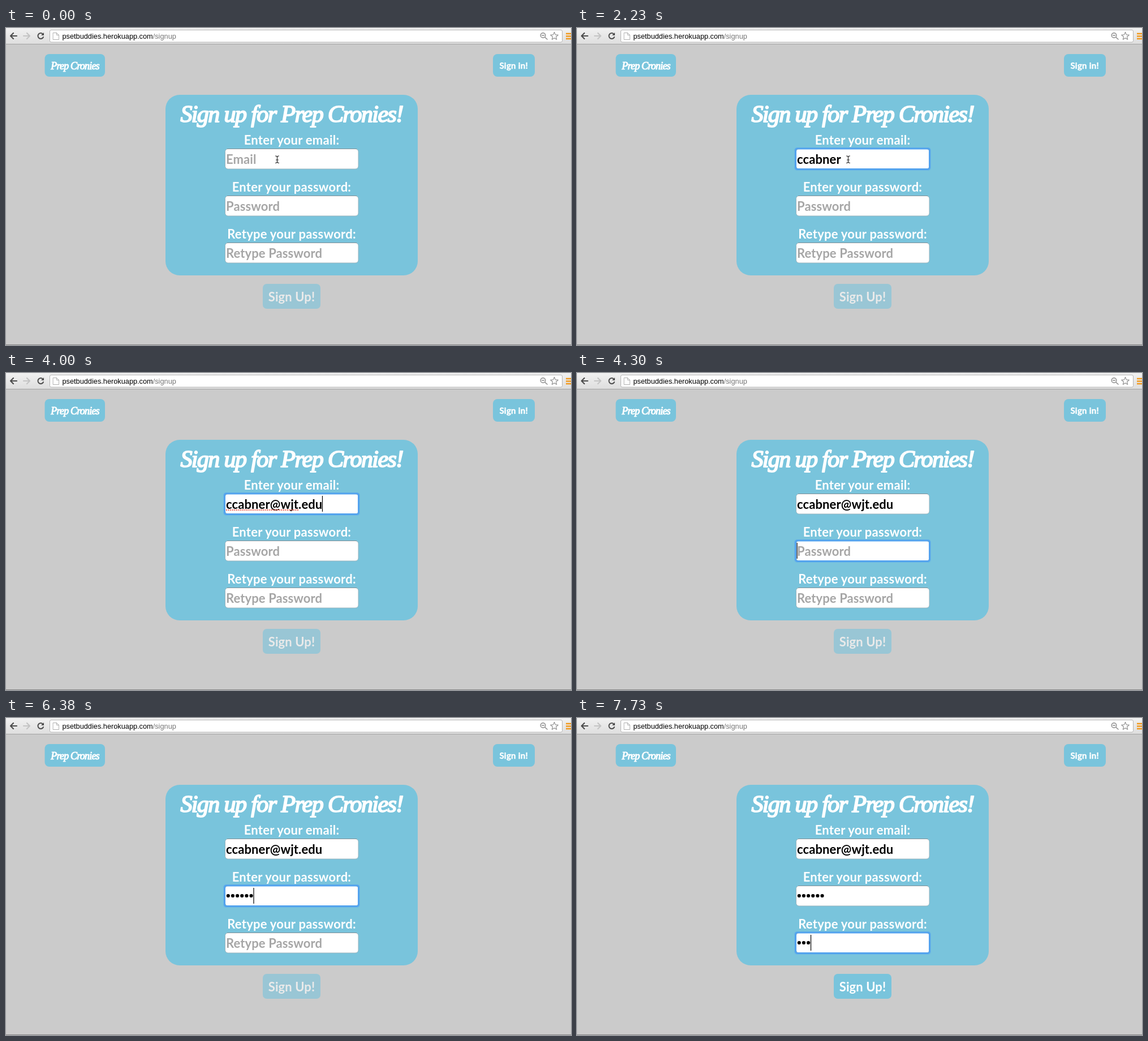
Recreate the animation shown at these times as an HTML page. Size 999 by 560 pixels, loop 8000 ms.

```html
<!DOCTYPE html>
<html lang="en">
<head>
<meta charset="utf-8">
<title>Sign up</title>
<style>
  html, body { margin: 0; width: 100%; height: 100%; overflow: hidden; background: #cbcbcb; }
  svg { display: block; }
  .url { font: 12.75px "Liberation Sans", Arial, sans-serif; }
  .body { font: 700 22px Lato, sans-serif; letter-spacing: .1px; fill: #fff; }
  .label { letter-spacing: .25px; }
  .small { font-size: 15px; letter-spacing: .25px; stroke: #fff; stroke-width: .4; stroke-linejoin: round; }
  .script {
    font: italic 400 42px "Liberation Serif", "Times New Roman", serif; letter-spacing: -1.6px;
    fill: #fff; stroke: #fff; stroke-width: 2; stroke-linejoin: round;
  }
  .brand { font-size: 18px; letter-spacing: -.8px; stroke-width: 1; }
  .mid { text-anchor: middle; }
  .blue { fill: #79c4dc; }
  .hint { fill: #a6a6a6; }
  .typed { fill: #000; }
  .box { fill: #fff; stroke: #9ab4bd; }
  .edge { stroke: #7f9097; }
  .ring { fill: none; stroke: #53a3ee; stroke-width: 3; }
  .glow { fill: none; stroke: #53a3ee; stroke-opacity: .3; }
  .caret { fill: #000; }
  .spell { stroke: #ee5a4a; stroke-width: 2; stroke-dasharray: 2 1.6; }
  .icon { fill: none; stroke-linecap: round; stroke-linejoin: round; }
</style>
</head>
<body>
<svg id="stage" width="999" height="560" viewBox="0 0 999 560">
  <defs>
    <linearGradient id="bar" x2="0" y2="1">
      <stop stop-color="#f1f1f1"/><stop offset="1" stop-color="#dedede"/>
    </linearGradient>
  </defs>
  <rect width="999" height="560" fill="#cbcbcb"/>

  <!-- browser bar -->
  <rect width="999" height="28" fill="url(#bar)"/>
  <rect y="28" width="999" height="1" fill="#a3a3a3"/>
  <rect x="77.5" y="3.5" width="906" height="21.5" rx="2.5" fill="#fff" stroke="#b4b4b4"/>
  <g class="icon">
    <path d="M19 14H8M13 9L8 14L13 19" stroke="#4d4d4d" stroke-width="2.2"/>
    <path d="M31 14H42M37 9L42 14L37 19" stroke="#c4c4c4" stroke-width="2.2"/>
    <path d="M65.5 11A5 5 0 1 0 66 16" stroke="#4d4d4d" stroke-width="2"/>
    <path d="M67 8V13H62Z" fill="#4d4d4d"/>
    <path d="M83.5 8.5H89.5L93.5 12.5V20.5H83.5ZM89.5 8.5V12.5H93.5" stroke="#b0b0b0"/>
    <circle cx="949.5" cy="13" r="4.3" stroke="#8a8a8a" stroke-width="1.4"/>
    <path d="M953 16.5L957 20M947.5 13H951.5" stroke="#8a8a8a" stroke-width="1.5"/>
    <path id="star" stroke="#8c8c8c" stroke-width="1.1"/>
  </g>
  <path d="M990 10H999M990 14.5H999M990 19H999" stroke="#f29a1f" stroke-width="2.4"/>
  <text class="url" x="99.5" y="18.5">psetbuddies.herokuapp.com<tspan fill="#777">/signup</tspan></text>

  <!-- page -->
  <rect class="blue" x="68.5" y="46" width="106.5" height="40" rx="8"/>
  <text class="script brand mid" x="122" y="73">Prep Cronies</text>
  <rect class="blue" x="861" y="46" width="74" height="40" rx="8"/>
  <text class="body small mid" x="897.7" y="72.3">Sign in!</text>
  <rect class="blue" x="282" y="118" width="446" height="319" rx="25"/>
  <text class="script mid" x="505" y="166">Sign up for Prep Cronies!</text>
  <g id="fields"></g>
  <g id="button">
    <rect class="blue" x="454" y="452" width="102" height="44" rx="7"/>
    <text class="body mid" x="505" y="482.5">Sign Up!</text>
  </g>
  <path id="mouse" class="icon" stroke="#222" stroke-width="1.1"
        d="M476.5 226Q479.5 226 479.5 228.5Q479.5 226 482.5 226M479.5 228V236M477.5 233H481.5M476.5 238.5Q479.5 238.5 479.5 236Q479.5 238.5 482.5 238.5"/>
  <rect y="559" width="999" height="1" fill="#858585"/>
</svg>
<script>
const LOOP = 8000, LEFT = 389, GAP = 83, DOT = 8.15, MAX_DOTS = 6;
const EMAIL = 'ccabner@wjt.edu';
const $ = id => document.getElementById(id);

function add(parent, tag, attrs, text = '') {
  const el = document.createElementNS('http://www.w3.org/2000/svg', tag);
  for (const key in attrs) el.setAttribute(key, attrs[key]);
  el.textContent = text;
  return parent.appendChild(el);
}
const show = (el, on) => el.setAttribute('visibility', on ? 'visible' : 'hidden');

const starPoints = Array.from({ length: 10 }, (_, i) => {
  const r = i % 2 ? 3.2 : 7.2, a = i * Math.PI / 5;
  return (969.5 + r * Math.sin(a)).toFixed(1) + ' ' + (14.5 - r * Math.cos(a)).toFixed(1);
});
$('star').setAttribute('d', 'M' + starPoints.join('L') + 'Z');

function makeField(label, hint, row) {
  const g = add($('fields'), 'g', { transform: `translate(0 ${row * GAP})` });
  add(g, 'text', { class: 'body label mid', x: 505, y: 205.6 }, label);
  add(g, 'rect', { class: 'box', x: 387.5, y: 213.5, width: 235.5, height: 35.5, rx: 5 });
  add(g, 'line', { class: 'edge', x1: 391, x2: 620, y1: 213.5, y2: 213.5 });
  const focus = add(g, 'g', {});
  add(focus, 'rect', { class: 'glow', x: 384.5, y: 211.5, width: 241, height: 40, rx: 4 });
  add(focus, 'rect', { class: 'ring', x: 386.5, y: 213, width: 237, height: 36.5, rx: 3 });
  const field = {
    focus,
    hint: add(g, 'text', { class: 'body hint', x: LEFT, y: 239.6 }, hint),
    caret: add(g, 'rect', { class: 'caret', y: 217, width: 1.2, height: 28 }),
    dots: []
  };
  if (row === 0) {
    field.text = add(g, 'text', { class: 'body typed', x: LEFT, y: 239.6 });
    field.spell = add(g, 'line', { class: 'spell', x1: LEFT, y1: 242, y2: 242 });
  } else {
    for (let i = 0; i < MAX_DOTS; i++)
      field.dots.push(add(g, 'circle', { cx: LEFT + 3.8 + i * DOT, cy: 231, r: 3.1 }));
  }
  return field;
}
const fields = [
  ['Enter your email:', 'Email'],
  ['Enter your password:', 'Password'],
  ['Retype your password:', 'Retype Password']
].map(([label, hint], row) => makeField(label, hint, row));

// Each step changes some of the state; counts are characters typed per field.
const steps = [
  [0, { focus: -1, email: 0, pass: 0, again: 0, caret: true, spell: 0, ready: false, mouse: true }],
  [150, { focus: 0 }],
  [750, { caret: false }],
  [890, { email: 1, caret: true }],
  [1040, { email: 2 }],
  [1190, { email: 3 }],
  [1330, { email: 4 }],
  [1480, { email: 6 }],
  [1780, { email: 7 }],
  [2230, { caret: false }],
  [2380, { email: 8, caret: true, mouse: false }],
  [2520, { spell: 7 }],
  [2670, { email: 9 }],
  [2810, { email: 10 }],
  [3110, { email: 11 }],
  [3410, { email: 12 }],
  [3560, { spell: 11 }],
  [3700, { email: 13 }],
  [3850, { email: 14 }],
  [4000, { email: 15 }],
  [4300, { focus: 1, spell: 0 }],
  [4890, { caret: false }],
  [5190, { pass: 1, caret: true }],
  [5490, { pass: 2 }],
  [5790, { pass: 3 }],
  [6090, { pass: 4 }],
  [6240, { pass: 5 }],
  [6380, { pass: 6 }],
  [6830, { focus: 2 }],
  [7130, { again: 1 }],
  [7280, { ready: true }],
  [7430, { again: 2 }],
  [7730, { again: 3 }]
];

function render(time) {
  const state = {};
  for (const [at, change] of steps) if (at <= time) Object.assign(state, change);
  const counts = [state.email, state.pass, state.again];

  fields.forEach((field, row) => {
    const count = counts[row], active = state.focus === row;
    show(field.focus, active);
    show(field.hint, count === 0);
    show(field.caret, active && state.caret);
    field.dots.forEach((dot, i) => show(dot, i < count));
    let width = count * DOT;
    if (field.text) {
      field.text.textContent = EMAIL.slice(0, count);
      width = count ? field.text.getComputedTextLength() : 0;
      show(field.spell, state.spell > 0);
      if (state.spell)
        field.spell.setAttribute('x2', LEFT + field.text.getSubStringLength(0, state.spell));
    }
    field.caret.setAttribute('x', LEFT - .5 + width);
  });
  $('button').setAttribute('opacity', state.ready ? 1 : .6);
  show($('mouse'), state.mouse);
}

const start = performance.now();
function tick() {
  render((performance.now() - start) % LOOP);
  requestAnimationFrame(tick);
}
tick();
</script>
</body>
</html>
```
